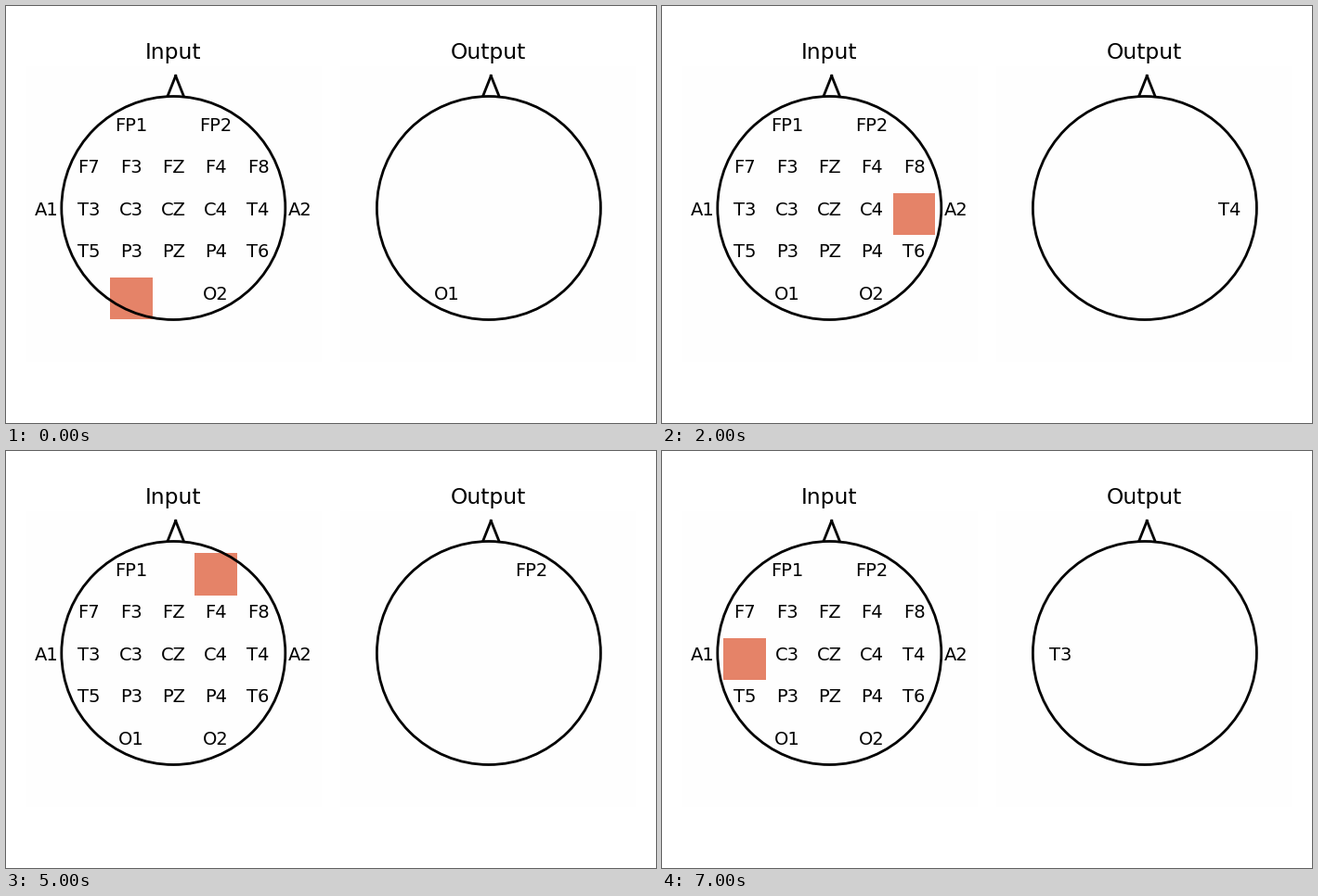
Recreate the animation shown at these times as a matplotlib script. Size 700 by 450 pixels, loop 8000 ms.

```python
import matplotlib.pyplot as plt
from matplotlib.animation import FuncAnimation
from matplotlib.patches import Circle, Rectangle

W, H, DPI = 700, 450, 100
CELL = 45.57
LEFT, TOP = 20.85, 64.85      # corner of the 7 x 7 cell panel
SHIFT = 339.6                 # distance between the two panels
ROWS = [
    ["", "", "FP1", "", "FP2", "", ""],
    ["", "F7", "F3", "FZ", "F4", "F8", ""],
    ["A1", "T3", "C3", "CZ", "C4", "T4", "A2"],
    ["", "T5", "P3", "PZ", "P4", "T6", ""],
    ["", "", "O1", "", "O2", "", ""],
]
SEQUENCE = ["O1", "F3", "T4", "P4", "FP1", "FP2", "T6", "T3"]
CELLS = {name: (col, row)
         for row, names in enumerate(ROWS)
         for col, name in enumerate(names) if name}

plt.rcParams["font.family"] = "DejaVu Sans"
fig = plt.figure(figsize=(W / DPI, H / DPI), dpi=DPI, facecolor="white")
ax = fig.add_axes([0, 0, 1, 1])
ax.set_xlim(0, W)
ax.set_ylim(H, 0)
ax.axis("off")


def draw_head(title, dx):
    ax.add_patch(Rectangle((round(LEFT + dx), round(TOP)), 319, 319,
                           fc="#fefefe", lw=0, zorder=0))
    ax.add_patch(Circle((180.3 + dx, 218), 120.5, fill=False,
                        ec="black", lw=2, zorder=3))
    for foot in (174, 191.4):
        ax.plot([foot + dx, 182.7 + dx], [97.3, 75.4], color="black", lw=2,
                solid_capstyle="projecting", zorder=3)
    ax.text(180.1 + dx, 56.5, title, fontsize=16.8, ha="center",
            va="baseline")


def draw_label(name, dx=0):
    col, row = CELLS[name]
    return ax.text(LEFT + CELL * (col + 0.5) + dx, 134.7 + CELL * row, name,
                   fontsize=14, ha="center", va="baseline", zorder=4)


draw_head("Input", 0)
draw_head("Output", SHIFT)
inputs = {name: draw_label(name) for name in CELLS}
outputs = {name: draw_label(name, SHIFT) for name in SEQUENCE}
mask = ax.add_patch(Rectangle((0, 0), 1, 1, fc="#e58368", lw=0, zorder=2))


def update(i):
    hidden = SEQUENCE[i]
    for name, label in inputs.items():
        label.set_visible(name != hidden)
    for name, label in outputs.items():
        label.set_visible(name == hidden)
    col, row = CELLS[hidden]
    x0, x1 = (round(LEFT + CELL * c) for c in (col, col + 1))
    y0, y1 = (round(TOP + CELL * r) for r in (row + 1, row + 2))
    mask.set_bounds(x0, y0, x1 - x0, y1 - y0)
    return [mask, *inputs.values(), *outputs.values()]


anim = FuncAnimation(fig, update, frames=len(SEQUENCE), interval=1000,
                     repeat=True, repeat_delay=0, blit=False)
plt.show()
```
